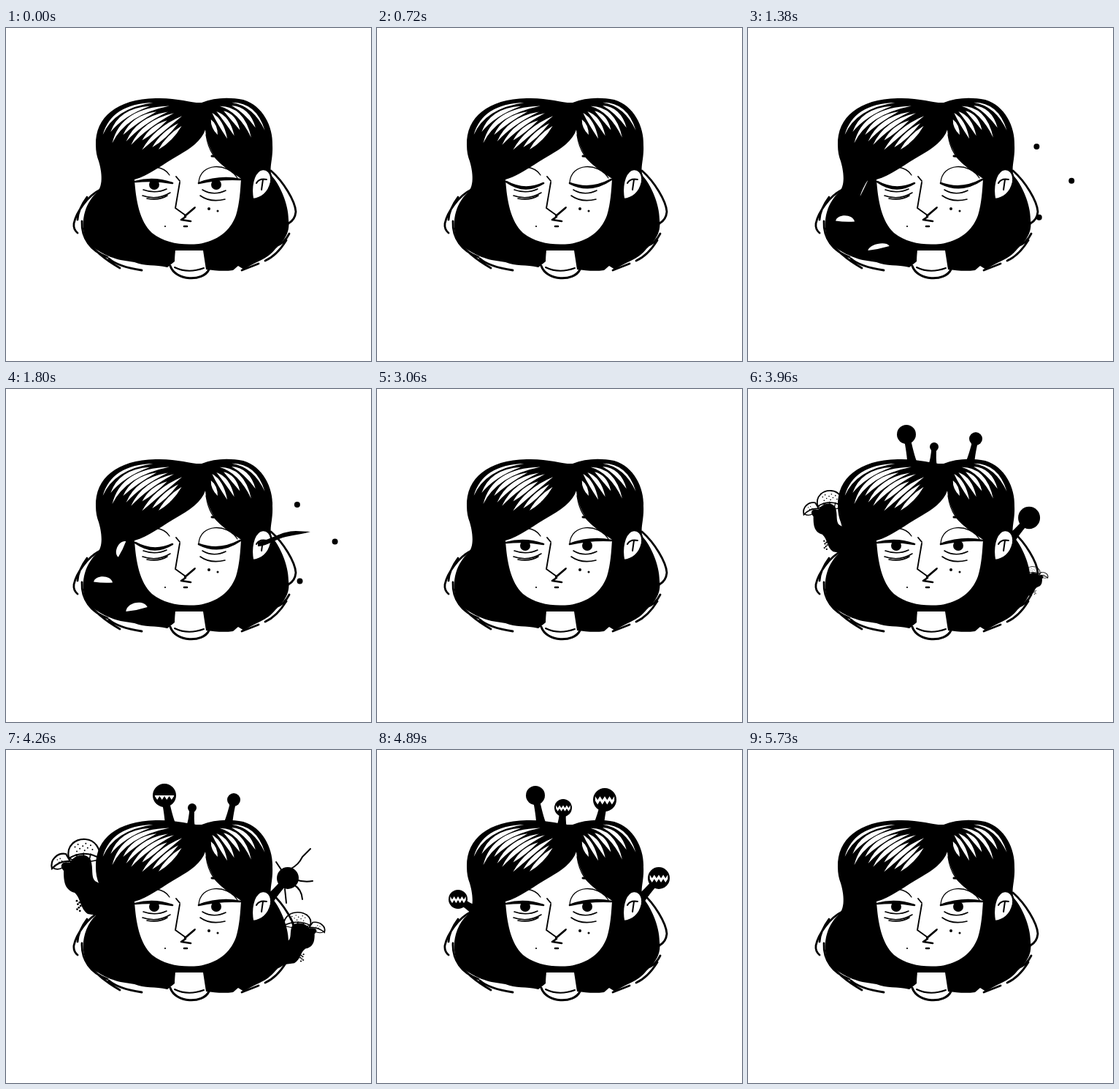
Write an HTML page that moves like this. It is 500x455 px and loops after 6030 ms.

```html
<!DOCTYPE html>
<html lang="en">
<head>
<meta charset="utf-8">
<title>Hair creatures</title>
<style>
  html, body { margin: 0; width: 100%; height: 100%; overflow: hidden; background: #fff; }
  svg { display: block; width: 100%; height: 100%; }
  .ink { fill: none; stroke: #000; stroke-linecap: round; stroke-linejoin: round; }
</style>
</head>
<body>
<svg viewBox="0 0 500 455">
  <g id="back"></g>

  <path d="M123 160C122 122 152 97 205 96C235 95 255 103 268 102C285 95 305 94 325 98C352 106 366 135 365 160C366 180 360 190 364 202C375 214 387 240 387 262C390 282 378 293 368 303C355 318 345 317 326 330L318 325L311 331C297 333 285 331 274 330L270 304H232L231 319L221 327C204 323 190 326 176 320L157 317C140 313 118 303 109 287C102 268 106 242 124 225C135 215 130 192 127 182Q123 172 123 160Z"/>
  <path fill="#fff" d="M273 139C268 154 252 165 238 173C215 186 195 202 176 207C178 236 183 264 200 280C218 294 240 297 264 295C289 291 307 278 315 256C320 240 321 222 322 206C308 196 295 189 286 176C278 163 274 151 273 139Z"/>
  <path fill="#fff" d="M232 304Q250 309 269 304L270 328Q250 335 231 326Z"/>
  <g id="shine" fill="#fff"></g>

  <path fill="#fff" stroke="#000" stroke-width="2.5" d="M338 234C335 218 338 200 348 194C358 190 365 199 363 211C360 225 350 233 338 234Z"/>
  <g class="ink" stroke-width="2.8">
    <path d="M363 195C380 210 396 236 397 251Q396 262 387 267M388 281Q381 295 369 298M384 290Q371 311 355 318M346 322L323 331"/>
    <path d="M129 221C112 229 96 252 93 267Q92 275 98 280M111 231Q99 247 98 262M104 264C103 287 116 305 139 313M112 290Q123 309 156 328M141 315Q153 326 186 331"/>
    <path stroke-width="3" d="M225 325C232 346 270 347 278 330M282 175L297 176"/>
    <path stroke-width="2" d="M343 212Q347 205 357 207M352 207L350 221M231 327Q249 336 271 328"/>
    <path stroke-width="1.3" d="M274 146C277 167 286 182 306 192L321 198M214 184L196 195"/>
    <path stroke-width="1.9" d="M233 203L238 209M238 211L232 246L246 256L259 245"/>
    <path stroke-width="2.6" d="M245 257L258 246M246 258L240 262L253 264M244 271H248"/>
    <path stroke-width="1.6" d="M188 221Q205 227 220 220M187 229Q207 236 225 225M193 233Q210 236 221 229M269 221Q284 230 301 222M266 229Q280 239 300 234"/>
  </g>
  <circle cx="278" cy="247" r="2"/><circle cx="290" cy="250" r="1.5"/><circle cx="218" cy="271" r="1.1"/>
  <g id="front"></g>
</svg>
<script>
const LOOP = 6030, STEP = 30;
const $ = id => document.getElementById(id);
const lerp = (a, b, k) => a + (b - a) * k;
const mix = (p, q, k) => [lerp(p[0], q[0], k), lerp(p[1], q[1], k)];
const range = n => [...Array(n).keys()];

// Eased 0..1 ramps: up over [a, b], down over [c, d].
function ramp(t, a, b) {
  const k = Math.min(1, Math.max(0, (t - a) / (b - a)));
  return k * k * (3 - 2 * k);
}
const pulse = (t, a, b, c, d) => ramp(t, a, b) - ramp(t, c, d);

const path = (d, attrs = '') => `<path d="${d}" ${attrs}/>`;
const line = (d, w) => path(d, `class="ink" stroke-width="${w}"`);
const dot = (x, y, r) => `<circle cx="${x}" cy="${y}" r="${r}"/>`;
const oval = (x, y, rx, ry) => `<ellipse cx="${x}" cy="${y}" rx="${rx}" ry="${ry}"/>`;
const group = (transform, body) => `<g transform="${transform}">${body}</g>`;
const growFrom = (x, y, k, body) =>
  k > 0.01 ? group(`translate(${x} ${y}) scale(${k}) translate(${-x} ${-y})`, body) : '';

// Tapered glints on a fan of strands, from the outer contour to the fringe.
function shine(count, root, outer, inner, width) {
  return range(count).map(i => {
    const u = i / (count - 1), wave = Math.sin(i * 2.4);
    const bend = mix(outer[0], inner[0], u), end = mix(outer[1], inner[1], u);
    const at = (p, q) => mix(mix(root, bend, p), mix(bend, end, p), q);
    const a = 0.27 + 0.07 * wave, b = 0.8 - 0.1 * u - 0.06 * wave;
    const [x1, y1] = at(a, a), [x2, y2] = at(b, b), [cx, cy] = at(a, b);
    const w = width * (0.6 + 0.4 * Math.min(1, i)), len = Math.hypot(x2 - x1, y2 - y1);
    const nx = (y1 - y2) / len * w, ny = (x2 - x1) / len * w;
    return path(`M${x1} ${y1}Q${cx + nx} ${cy + ny} ${x2} ${y2}Q${cx - nx} ${cy - ny} ${x1} ${y1}Z`);
  }).join('');
}
$('shine').innerHTML =
  shine(10, [268, 106], [[125, 82], [128, 180]], [[220, 155], [185, 190]], 6.2) +
  shine(7, [272, 108], [[350, 80], [362, 172]], [[284, 128], [302, 178]], 5.4);

function eye(closed, x1, y1, x2, y2, px, crease) {
  const cx = (x1 + x2) / 2, cy = (y1 + y2) / 2 + lerp(-4, 17, closed);
  const lid = `M${x1} ${y1}Q${cx} ${cy} ${x2} ${y2}`;
  return (closed < 0.9 ? oval(px, 214 + 3 * closed, 7, 7 * (1 - closed)) : '') +
    path(`${lid}Q${cx} 199 ${x1} ${y1}Z`, 'fill="#fff"') +
    line(crease, 1.3) +
    path(`${lid}Q${cx} ${cy - 4} ${x1} ${y1}Z`, 'stroke="#000" stroke-width="2.6" stroke-linejoin="round"');
}
function face(t) {
  const closed = pulse(t, 30, 720, 810, 960) + pulse(t, 1110, 1230, 2070, 2250);
  return eye(closed, 177, 210, 228, 212, 203, 'M205 190Q219 192 224 201') +
    eye(closed, 264, 212, 321, 207, 288, 'M264 211C266 184 303 183 317 205');
}

// x, y, tilt, half width
const sleepyEyes = [[133, 264, 2, 13], [179, 301, -12, 15], [159, 219, -64, 12]];
const wideEyes = [
  [150, 203, 14, 10], [161, 250, 14, 12], [186, 188, -22, 9],
  [299, 301, 50, 13], [344, 294, 35, 11], [346, 257, 75, 13]
];
const hairEye = ([x, y, tilt, w], open, body) =>
  open < 0.03 ? '' : group(`translate(${x} ${y}) rotate(${tilt}) scale(${w} ${w * open})`, body);
const shutLook = path('M-1 0C-.8 -.8 .8 -.8 1 0Q0 .1 -1 0Z', 'fill="#fff"');
const openLook = path('M-1 -.2Q0 -.7 1 -.1Q.4 1.1 -1 -.2Z', 'fill="#fff"') + dot(0.25, -0.2, 0.3);
function hairEyes(t) {
  return sleepyEyes.map((e, i) =>
    hairEye(e, pulse(t, 1140 + i * 90, 1380 + i * 90, 1890 + i * 60, 2100 + i * 60), shutLook)).join('') +
    wideEyes.map((e, i) =>
      hairEye(e, pulse(t, 3060 + i * 50, 3240 + i * 50, 3570 + i * 20, 3780 + i * 20), openLook)).join('');
}

// Two waves of three specks fan out of the ear, then a feeler follows.
function earBurst(t) {
  let out = '';
  for (const start of [1110, 1500]) {
    const k = (t - start) / 690;
    if (k <= 0 || k >= 1) continue;
    const go = 1 - (1 - k) ** 2;
    for (const lane of [-1, 0, 1]) {
      const angle = (lane * 47 - 2) * Math.PI / 180, reach = (145 - 40 * Math.abs(lane)) * go;
      out += dot(352 + reach * Math.cos(angle), 212 + reach * Math.sin(angle), Math.min(4, 14 * k, 14 * (1 - k)));
    }
  }
  return out + growFrom(346, 212, pulse(t, 1560, 1770, 1830, 2100),
    path('M345 209C363 206 377 194 397 194L417 195C399 200 386 200 374 205C364 209 354 215 345 215Z'));
}

function mouth(r, open, flat) {
  if (open < 0.03) return '';
  const n = 8, w = r * 0.82;
  let top = [], bottom = [];
  for (let i = 0; i <= n; i++) {
    const x = lerp(-w, w, i / n), tooth = i % 2 ? r * 0.32 : 0;
    top.push(`${x} ${flat ? 0 : tooth - r * 0.3}`);
    bottom.unshift(`${x} ${flat ? tooth + 1 : tooth + r * 0.08}`);
  }
  return group(`scale(1 ${open})`, path(`M${top.concat(bottom).join('L')}Z`, 'fill="#fff"'));
}

// Heads widen from slim to full while they bite.
const stalks = [
  { base: [225, 102], tip: [217, 62], slim: 13, full: 16, born: 3390, bite: 3990, calm: 4320, flat: true },
  { base: [253, 104], tip: [255, 79], slim: 6, full: 12, born: 3510, bite: 4590, calm: 5010 },
  { base: [304, 102], tip: [312, 68], slim: 9, full: 16, born: 3510, bite: 4620, calm: 5070 },
  { base: [359, 206], tip: [386, 175], slim: 15, full: 15, born: 3720, bite: 4680, calm: 5130 },
  { base: [134, 219], tip: [111, 204], slim: 13, full: 13, born: 4470, bite: 4680, calm: 5280 }
];
function stalk(t, s, i) {
  const fall = 4980 + 120 * i;
  const g = pulse(t, s.born, s.born + 270, fall, fall + 270);
  if (g < 0.01) return '';
  const bite = pulse(t, s.bite, s.bite + 150, s.calm, s.calm + 150);
  const r = lerp(s.slim, s.full, bite) * Math.min(1, 0.1 + g);
  const [bx, by] = s.base, [x, y] = mix(s.base, s.tip, g);
  const len = Math.hypot(x - bx, y - by) || 1, nx = (by - y) / len, ny = (x - bx) / len;
  const side = (px, py, k) => `${px + nx * k} ${py + ny * k}`;
  const neck = (2.5 + r * 0.15) * g * g, foot = 5 + r * 0.15;
  return path(`M${side(bx, by, foot)}Q${side(lerp(bx, x, .3), lerp(by, y, .3), neck)} ${side(x, y, neck)}` +
      `L${side(x, y, -neck)}Q${side(lerp(bx, x, .3), lerp(by, y, .3), -neck)} ${side(bx, by, -foot)}Z`) +
    group(`translate(${x} ${y})`, oval(0, 0, r, r * (1.4 - 0.4 * g)) + mouth(r, bite, s.flat));
}

// Soft bumps swell on the crown before the stalks shoot up.
function mounds(t) {
  const rise = pulse(t, 3390, 3510, 3570, 3750);
  if (rise < 0.01) return '';
  return oval(270, 102, 42, 7 * rise) +
    [240, 263, 293].map(x => path(`M${x - 11} 102Q${x - 6} 98 ${x - 6} ${102 - 13 * rise}` +
      `Q${x} ${102 - 25 * rise} ${x + 6} ${102 - 13 * rise}Q${x + 6} 98 ${x + 11} 102Z`)).join('');
}

const scatter = (x, y, w, h, n, r) =>
  range(n).map(i => dot(x + w * (i * 0.618 % 1), y + h * (i + 0.5) / n, r)).join('');
const cap = d => path(d, 'fill="#fff" stroke="#000" stroke-width="2.2"');
const fungus =
  cap('M86 148C82 130 96 121 109 122C122 123 129 134 130 149Q108 135 86 148Z') +
  cap('M63 162C60 150 70 140 82 142L88 152Q73 151 63 162Z') +
  line('M64 161Q74 167 86 154M86 148Q106 157 129 149M96 143L101 151M106 141L108 151M116 142L114 151', 1.6) +
  path('M137 228L112 224C101 216 103 203 94 195C80 191 79 179 79 165C72 158 77 151 87 154C94 143 109 139 116 150C120 162 116 173 122 179L142 190Z') +
  scatter(92, 126, 28, 13, 11, 1) + scatter(68, 146, 10, 8, 5, 0.8) + scatter(97, 205, 6, 16, 7, 1.4);
const mirrored = group('translate(374 294) scale(-.84 .68) translate(-137 -228)', fungus);
const spikes = line('M389 163C398 158 402 154 406 146L417 135M396 177Q408 181 420 179M394 184Q405 190 406 204M382 190L384 209M378 165L370 153', 2);

function growths(t) {
  const swell = born => pulse(t, born, born + 330, 4380, 4740);
  return growFrom(137, 215, swell(3720), fungus) +
    growFrom(377, 270, swell(3780), mirrored) +
    growFrom(384, 178, pulse(t, 3990, 4200, 4320, 4560), spikes) +
    mounds(t) + stalks.map((s, i) => stalk(t, s, i)).join('');
}

const start = performance.now();
function draw() {
  const t = Math.floor((performance.now() - start) % LOOP / STEP) * STEP;
  $('back').innerHTML = growths(t);
  $('front').innerHTML = face(t) + hairEyes(t) + earBurst(t);
  requestAnimationFrame(draw);
}
draw();
</script>
</body>
</html>
```
